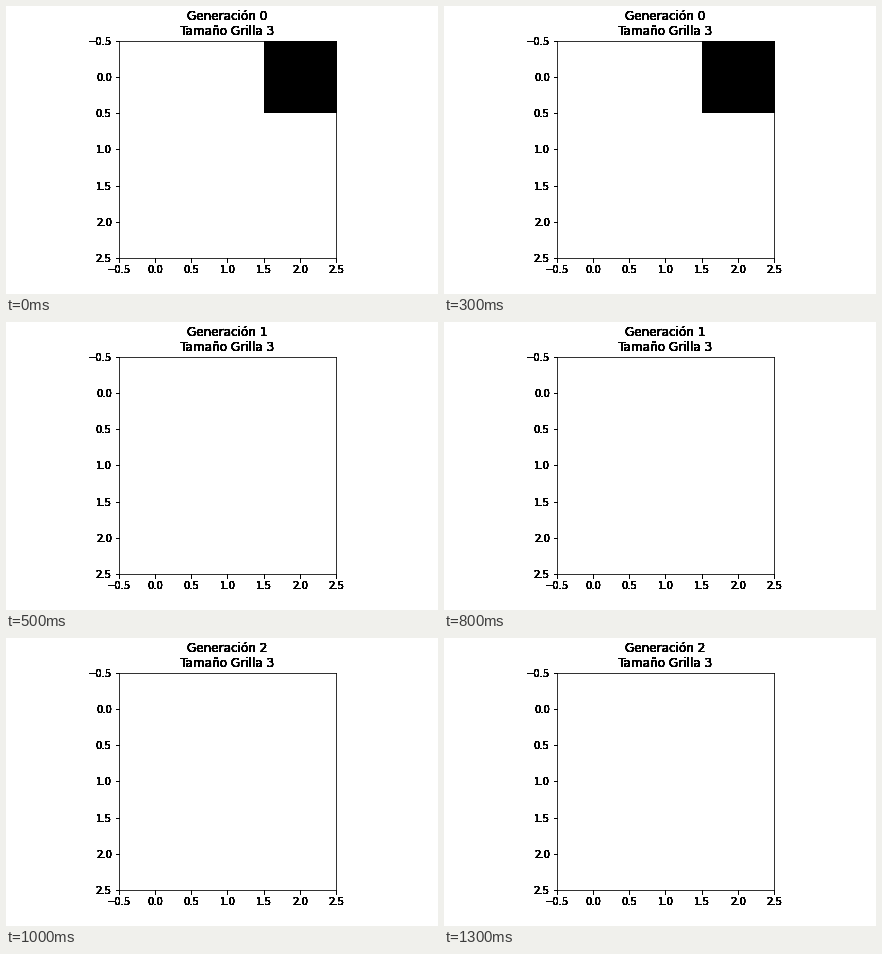
These frames come from a looping animation (432 by 288 pixels, 1500 ms). A matplotlib script:

```python
import numpy as np
import matplotlib.pyplot as plt
from matplotlib.animation import FuncAnimation

SIZE = 3
GENERATIONS = 3
LAYERS = 12  # labels are drawn repeatedly to get hard, heavy edges

plt.rcParams.update({"font.family": "DejaVu Sans", "font.size": 10})


def step(grid):
    """One generation of Conway's Game of Life, with dead borders."""
    padded = np.pad(grid, 1)
    around = sum(
        padded[r:r + SIZE, c:c + SIZE]
        for r in range(3) for c in range(3) if (r, c) != (1, 1)
    )
    return ((around == 3) | ((grid == 1) & (around == 2))).astype(int)


def add_layer(fig):
    ax = fig.add_axes([0.125, 0.125, 0.775, 0.755])
    ax.set(xlim=(-0.5, SIZE - 0.5), ylim=(SIZE - 0.5, -0.5), aspect="equal")
    ticks = np.arange(-0.5, SIZE, 0.5)
    ax.set_xticks(ticks)
    ax.set_yticks(ticks)
    return ax


start = np.zeros((SIZE, SIZE), int)
start[0, SIZE - 1] = 1
history = [start]
while len(history) < GENERATIONS:
    history.append(step(history[-1]))

fig = plt.figure(figsize=(6, 4), dpi=72, facecolor="white")
layers = [add_layer(fig) for _ in range(LAYERS)]
for ax in layers[1:]:
    ax.patch.set_visible(False)
    ax.spines[:].set_visible(False)

image = layers[0].imshow(start, cmap="binary", vmin=0, vmax=1,
                         interpolation="nearest")


def update(generation):
    image.set_data(history[generation])
    for ax in layers:
        ax.set_title(f"Generación {generation}\nTamaño Grilla {SIZE}")
    return [image]


anim = FuncAnimation(fig, update, frames=GENERATIONS, interval=500,
                     repeat=True, repeat_delay=0, blit=False)
plt.show()
```
